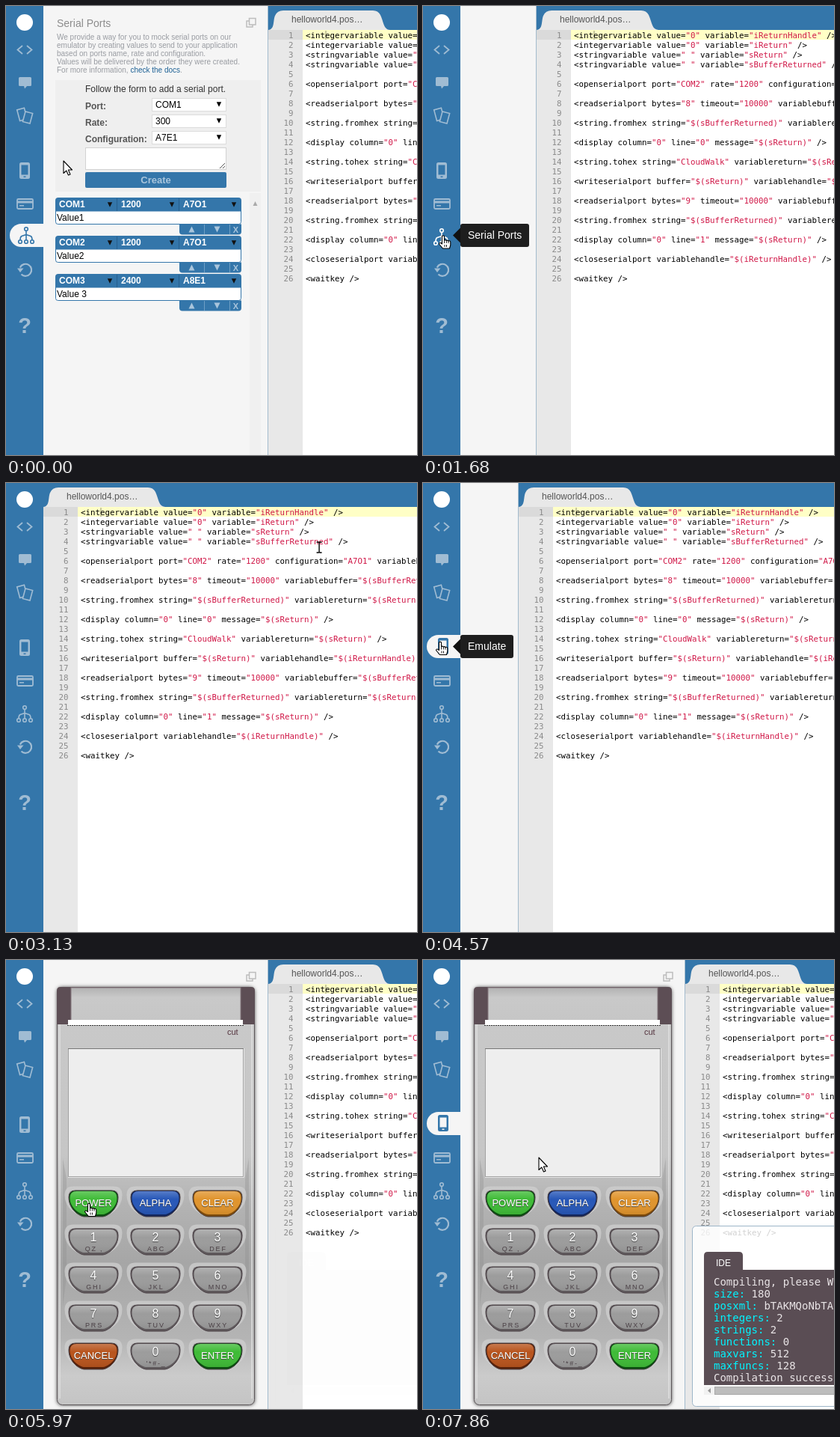
An HTML page for the animation above (8000 ms loop, 550 by 600 pixels).

```html
<!DOCTYPE html>
<html lang="en">
<head>
<meta charset="utf-8">
<title>Serial ports and emulator</title>
<style>
  html, body { margin: 0; width: 100%; height: 100%; overflow: hidden; background: #fff; }
  svg { display: block; width: 550px; height: 600px; }
  text { font-family: "Liberation Sans", Arial, sans-serif; white-space: pre; }
  .mono { font-family: "DejaVu Sans Mono", "Liberation Mono", monospace; }
  .code { font-size: 10.8px; }
  .b { font-weight: bold; }
</style>
</head>
<body>
<svg id="stage" viewBox="0 0 550 600" xmlns="http://www.w3.org/2000/svg"></svg>
<script>
const LOOP = 8000, OPEN = 351, SHUT = 50;
const BLUE = '#3476aa', PANEL = '#f5f5f5', ICON = '#a0bcd3';
const SLIDE = 200, CLOSE_AT = 1560, OPEN_AT = 4503;

const esc = s => s.replace(/&/g, '&amp;').replace(/</g, '&lt;').replace(/>/g, '&gt;');
const rect = (x, y, w, h, fill, more = '') =>
  `<rect x="${x}" y="${y}" width="${w}" height="${h}" fill="${fill}" ${more}/>`;
const text = (x, y, size, fill, s, more = '') =>
  `<text x="${x}" y="${y}" font-size="${size}" fill="${fill}" ${more}>${esc(s)}</text>`;
const path = (d, fill, more = '') => `<path d="${d}" fill="${fill}" ${more}/>`;
const group = (id, body, more = '') => `<g id="${id}" ${more}>${body}</g>`;
const down = (x, y, fill, r = 3.5) => path(`M${x - r},${y - r}h${2 * r}l${-r},${2 * r}z`, fill);
const up = (x, y, fill, r = 4) => path(`M${x - r},${y + r}h${2 * r}l${-r},${-2 * r}z`, fill);

// Sidebar
const phoneIcon = path('M20.5,209h9a2.5,2.5 0 0 1 2.5,2.5v17a2.5,2.5 0 0 1 -2.5,2.5h-9a2.5,2.5 0 0 1 -2.5,-2.5v-17a2.5,2.5 0 0 1 2.5,-2.5z'
  + 'M20.5,212.5v13h9v-13zM23.5,227.5v1.5h3v-1.5z', 'currentColor', 'fill-rule="evenodd"');
const netIcon = [[25, 300], [17, 317], [25, 317], [33, 317]]
  .map(([x, y]) => `<circle cx="${x}" cy="${y}" r="2.3" fill="none" stroke="currentColor" stroke-width="1.6"/>`).join('')
  + path('M25,302.5V314.5M25,307.5L19,309.5Q17,310.5 17,314.5M25,307.5L31,309.5Q33,310.5 33,314.5', 'none',
    'stroke="currentColor" stroke-width="1.6"');
const pill = y => path(`M50,${y}H20.5a15.5,15.5 0 0 0 0,31H50z`, PANEL);

function sidebar() {
  const line = `stroke="${ICON}" stroke-width="1.8"`;
  return rect(0, 0, 50, 600, BLUE)
    + '<circle cx="25" cy="22" r="11" fill="#fff"/>'
    + path('M22,53L15.5,58.5L22,64M28,53L34.5,58.5L28,64', 'none', line)
    + path('M18.5,95h14a1.5,1.5 0 0 1 1.5,1.5v9a1.5,1.5 0 0 1 -1.5,1.5h-4.5l-3,3.5l-1,-3.5h-5.5a1.5,1.5 0 0 1 -1.5,-1.5v-9a1.5,1.5 0 0 1 1.5,-1.5z', ICON)
    + rect(16.5, 137.5, 10, 15, 'none', `stroke="${ICON}" stroke-width="1.6" transform="rotate(-15 21 145)"`)
    + rect(24, 142, 10, 14, BLUE, `stroke="${ICON}" stroke-width="1.6" transform="rotate(15 29 149)"`)
    + rect(15, 258, 21, 13, 'none', `rx="1.5" ${line}`) + rect(15, 260.5, 21, 3, ICON)
    + rect(18, 266, 6, 1.5, ICON)
    + path('M18.8,349.5A8,8 0 1 1 20.5,358.5', 'none', `stroke="${ICON}" stroke-width="2.2"`)
    + path('M15,350.5h8.5l-4.5,5.5z', ICON)
    + text(25, 437, 29, ICON, '?', 'class="b" text-anchor="middle"')
    + group('phonePill', pill(203)) + group('phone', phoneIcon)
    + group('netPill', pill(291)) + group('net', netIcon);
}

const popIcon = '<g fill="#f5f5f5" stroke="#bdbdbd" stroke-width="1.5"><rect x="322" y="20" width="8" height="8"/><rect x="325.500" y="16.500" width="8.500" height="8.500"/></g>';

// Serial port form and list
function select(y, label, value) {
  return text(106, y + 15, 12, '#555', label, 'class="b"')
    + rect(195.5, y + .5, 99, 17, '#fff', 'stroke="#dcdcdc"')
    + text(200, y + 13, 12, '#000', value) + down(285, y + 8.5, '#000', 3.2);
}

function port(y, name, rate, config, value) {
  const pale = '#a9c5dc';
  return rect(66.5, y + 4, 248, 31.5, '#fff', `rx="3" stroke="${BLUE}"`)
    + path(`M66,${y + 18.5}v-14.500a4,4 0 0 1 4,-4h241a4,4 0 0 1 4,4v14.500z`, BLUE)
    + [148, 231].map(x => rect(x, y + 1, 1, 17, '#275f8d')).join('')
    + [name, rate, config].map((s, i) => text(71 + 83 * i, y + 13, 12, '#fff', s, 'class="b"')
      + down(139 + 83 * i, y + 9.5, '#111', 3.2)).join('')
    + text(68, y + 31, 12, '#000', value)
    + path(`M232,${y + 35.5}h83v10a4,4 0 0 1 -4,4h-75a4,4 0 0 1 -4,-4z`, BLUE)
    + [265, 299].map(x => rect(x, y + 36, 1, 13, '#6f9fc5')).join('')
    + up(248.5, y + 42.5, pale) + down(282.5, y + 42.5, pale, 4)
    + text(307.5, y + 47, 11, pale, 'X', 'class="b" text-anchor="middle"');
}

function serialPanel() {
  const intro = ['We provide a way for you to mock serial ports on our',
    'emulator by creating values to send to your application',
    'based on ports name, rate and configuration.',
    'Values will be delivered by the order they were created.'];
  return text(68, 28, 14, '#8c8c8c', 'Serial Ports') + popIcon
    + intro.map((s, i) => text(68, 45 + 10.9 * i, 10, '#999ca2', s)).join('')
    + '<text x="68" y="88.600" font-size="10" fill="#999ca2">For more information, <tspan fill="#1f6296">check the docs</tspan>.</text>'
    + rect(66, 99, 275, 149, '#efefef')
    + text(106, 115, 12, '#333', 'Follow the form to add a serial port.')
    + select(123, 'Port:', 'COM1') + select(145, 'Rate:', '300') + select(167, 'Configuration:', 'A7E1')
    + rect(106.5, 189.5, 188, 29, '#fff', 'stroke="#d2d2d2"')
    + path('M286,217l7,-7M290,217l3,-3', 'none', 'stroke="#555"')
    + rect(106, 222, 189, 21, BLUE, 'rx="2"')
    + text(200.5, 237, 13, '#a9c5dc', 'Create', 'class="b" text-anchor="middle"')
    + rect(326, 250, 15, 350, '#f0f0f0') + up(333.5, 264, '#aaa', 3)
    + port(256, 'COM1', '1200', 'A7O1', 'Value1')
    + port(307, 'COM2', '1200', 'A7O1', 'Value2')
    + port(358, 'COM3', '2400', 'A8E1', 'Value 3');
}

// Card terminal
const KEYS = ['POWER', 'ALPHA', 'CLEAR', '1QZ ,', '2ABC', '3DEF', '4GHI', '5JKL', '6MNO',
  '7PRS', '8TUV', '9WXY', 'CANCEL', "0'*#-_", 'ENTER'];
const TINT = {
  POWER: ['#3fbb37', '#0b4d10'], ENTER: ['#3fbb37', '#0b4d10'], ALPHA: ['#2757b8', '#13265c'],
  CLEAR: ['#e0942d', '#7c4a0c'], CANCEL: ['#b8541d', '#57210a']
};
const bowl = (w, h) => `M${-w},9Q${-w},0 ${9 - w},0H${w - 9}Q${w},0 ${w},9C${w},${h * .74} ${w * .55},${h} 12,${h}`
  + `H-12C${-w * .55},${h} ${-w},${h * .74} ${-w},9z`;

function key(label, i) {
  const [face, edge] = TINT[label] || ['#9c9c9c', '#5f595c'];
  const x = 117 + 83 * (i % 3), y = 308 + 51 * Math.floor(i / 3);
  const shadow = 'text-anchor="middle" style="text-shadow:0 1px 1px #444"';
  const caption = TINT[label]
    ? text(0, 21, 13, '#fff', label, shadow)
    : text(0, 17, 16, '#fff', label[0], shadow)
      + text(1, 29.5, 9, '#4b4146', label.slice(1), 'text-anchor="middle" letter-spacing="1.8"');
  return `<g transform="translate(${x},${y})">`
    + path(bowl(36, 35), 'none', 'transform="translate(0,-3)" stroke="#cfcfcf" stroke-width="5" opacity=".75"')
    + path(bowl(33, 35), edge, 'stroke="#4a4045" stroke-width="1"')
    + path(bowl(31.5, 31), face, 'transform="translate(0,1)"')
    + path(bowl(31.5, 31), 'url(#gloss)', 'transform="translate(0,1)"')
    + caption + '</g>';
}

function terminal() {
  return popIcon
    + rect(68, 36, 265, 559, '#555', 'rx="7" filter="url(#soft)"')
    + rect(68.5, 36.5, 264, 558, 'url(#body)', 'rx="7" stroke="#5b5558"')
    + rect(71, 86, 2, 500, '#e2e2e2', 'opacity=".7"') + rect(328, 86, 2, 500, '#e2e2e2', 'opacity=".7"')
    + path('M76,265l5,28v130l-5,40zM325,265l-5,28v130l5,40z', '#8e8e8e', 'opacity=".35"')
    + path('M68,86V41q0,-5 5,-5H328q5,0 5,5V86z', '#5d4e55')
    + rect(87, 37, 227, 44, 'url(#slot)', 'stroke="#85787e"')
    + rect(83, 80, 234, 7, '#fff')
    + path('M82,87.5H318', 'none', 'stroke="#333" stroke-dasharray="2 1"')
    + text(296, 100, 11, '#54333e', 'cut')
    + rect(83.5, 118.5, 234, 171, '#eee', 'stroke="#a2a2a2"')
    + path('M83,118.5H318', 'none', 'stroke="#777"')
    + path('M83,290.500H318.500V118', 'none', 'stroke="#e6e6e6"')
    + KEYS.map(key).join('');
}

// Code editor, drawn from its own left edge
const fromHex = '<string.fromhex string="$(sBufferReturned)" variablereturn="$(sReturn)" />';
const read = n => `<readserialport bytes="${n}" timeout="10000" variablebuffer="$(sBufferReturned)" />`;
const show = n => `<display column="0" line="${n}" message="$(sReturn)" />`;
const CODE = [
  '<integervariable value="0" variable="iReturnHandle" />',
  '<integervariable value="0" variable="iReturn" />',
  '<stringvariable value=" " variable="sReturn" />',
  '<stringvariable value=" " variable="sBufferReturned" />', '',
  '<openserialport port="COM2" rate="1200" configuration="A7O1" variablehandle="$(iReturnHandle)" />', '',
  read(8), '', fromHex, '', show(0), '',
  '<string.tohex string="CloudWalk" variablereturn="$(sReturn)" />', '',
  '<writeserialport buffer="$(sReturn)" variablehandle="$(iReturnHandle)" />', '',
  read(9), '', fromHex, '', show(1), '',
  '<closeserialport variablehandle="$(iReturnHandle)" />', '', '<waitkey />'];

function codeLine(s, i) {
  const y = 43 + 13 * i;
  const colored = esc(s).replace(/"[^"]*"/g, q => `<tspan fill="#d01747">${q}</tspan>`);
  return text(33.5, y, 10.8, '#8a8a8a', String(i + 1), 'class="mono" text-anchor="end"')
    + `<text x="50" y="${y}" class="mono code" fill="#000">${colored}</text>`;
}

function editor() {
  return rect(0, 0, 520, 32, BLUE) + rect(46, 32, 480, 568, '#fff')
    + rect(0, 32, 46, 568, '#e8e8e8')
    + rect(0, 32, 46, 13, '#dadada') + rect(46, 32, 480, 13, '#ffffc6')
    + path('M0,32C9,31 6,20 9,13Q12,6 20,6H140Q147,6 150,12C155,23 154,31 163,32z', '#e8e8e8')
    + text(31, 22, 12, '#555', 'helloworld4.pos…')
    + rect(76.5, 33, 1, 12, '#8f8f70')
    + CODE.map(codeLine).join('')
    + group('edge', rect(-1, 0, 1, 600, '#a3bbcd'));
}

// Compiler output
const LOG = ['Compiling, please Wait', 'size: 180', 'posxml: bTAKMQoNbTAKMQ', 'integers: 2', 'strings: 2',
  'functions: 0', 'maxvars: 512', 'maxfuncs: 128', 'Compilation successful'];

function consoleBox() {
  const lines = LOG.map((s, i) => `<text x="389" y="${435 + 16 * i}" font-size="14" class="mono" fill="#e9e4e6">`
    + s.replace(/^\w+:/, k => `<tspan fill="#00f4ff">${k}</tspan>`) + '</text>').join('');
  return rect(360.5, 355.5, 220, 241, '#fff', 'fill-opacity=".82" rx="5" stroke="#9db5c8"')
    + path('M376,414V395q0,-5 5,-5h42q5,0 5,5v19z', '#5a4d54')
    + text(392, 409, 12, '#fff', 'IDE')
    + rect(376, 414, 180, 154, '#5a4d54')
    + rect(376, 570, 180, 11, '#f1f1f1') + path('M381,575.500l4,-3.500v7z', '#999')
    + group('log', lines + rect(390.5, 570.5, 170, 10, '#bdbdbd', 'stroke="#a8a8a8"'));
}

function tip(id, y, label, w) {
  return group(id, path(`M40,${y + 15.5}l10,-10v20z`, '#111') + rect(50, y, w, 31, '#1e1e1e', 'rx="3"')
    + text(60, y + 20, 14, '#fff', label));
}

const ink = 'stroke="#000" stroke-width="1.1" stroke-linejoin="round"';
const cursors =
  group('arrow', path('M0,0V16.500L3.800,13L6.500,19L9,18L6.400,12H11.500z', '#fff', ink))
  + group('hand', path('M-1.500,1Q0,-.5 1.500,1V6.500Q3,5.500 4.300,7Q6,6 7,7.600Q9.500,6.500 9.800,9V13L8.500,17.500H-.5'
    + 'L-5.500,11.500Q-5,9 -2.500,10.500L-1.500,11.500z', '#fff', ink)
    + path('M1.500,6.500v4M4.300,7v3.500M7,7.600v3M2,12.500v3M4.500,12.500v3', 'none', 'stroke="#000" stroke-width=".9"'))
  + group('beam', path('M-3.500,-7H-1Q0,-7 0,-6Q0,-7 1,-7H3.500M0,-6V6M-3.500,7H-1Q0,7 0,6Q0,7 1,7H3.500', 'none',
    'stroke="#000" stroke-width="1.4"'));

const stops = list => list.map(([o, c]) => `<stop offset="${o}" stop-color="${c}"/>`).join('');
const gradient = (id, list) => `<linearGradient id="${id}" x2="0" y2="1">${stops(list)}</linearGradient>`;
const stage = document.getElementById('stage');
stage.innerHTML = '<defs>'
  + gradient('body', [[0, '#c9c9c9'], [.4, '#c6c6c6'], [.52, '#b3b3b3'], [.66, '#a6a6a6'], [.84, '#b4b4b4'], [.93, '#cbcbcb'], [1, '#c4c4c4']])
  + gradient('slot', [[0, '#b2b2b2'], [.3, '#c9c9c9'], [1, '#c6c6c6']])
  + '<linearGradient id="gloss" x2="0" y2="1"><stop offset="0" stop-color="#fff" stop-opacity=".22"/>'
  + '<stop offset=".35" stop-color="#fff" stop-opacity="0"/><stop offset="1" stop-color="#000" stop-opacity=".08"/></linearGradient>'
  + '<filter id="soft" x="-10%" y="-5%" width="120%" height="110%"><feGaussianBlur stdDeviation="2.5"/></filter></defs>'
  + rect(0, 0, 550, 600, PANEL) + group('serial', serialPanel()) + group('device', terminal())
  + group('editor', editor()) + group('console', consoleBox()) + sidebar()
  + tip('netTip', 291, 'Serial Ports', 92) + tip('phoneTip', 203, 'Emulate', 71)
  + group('cursor', cursors);

const el = {};
stage.querySelectorAll('g[id]').forEach(g => el[g.id] = g);
const toggle = (id, on) => { el[id].style.display = on ? '' : 'none'; };
const clamp = v => Math.max(0, Math.min(1, v));
const swing = v => .5 - Math.cos(Math.PI * clamp(v)) / 2;

// Pointer path: time, x, y
const PATH = [[0, 77, 207], [500, 77, 207], [760, 34, 268], [900, 20, 296], [1010, 27, 306.5], [1690, 27, 306.5],
  [1900, 75, 238], [2090, 165, 160], [2270, 245, 115], [2560, 330, 100], [2850, 388, 90], [3080, 410, 86],
  [3130, 419, 86], [3200, 424, 85], [3350, 370, 102], [3600, 190, 160], [3800, 55, 206], [3910, 24, 213],
  [3990, 24, 211], [4150, 23, 212], [4570, 23, 212], [4770, 31, 212], [4950, 60, 245], [5130, 95, 315],
  [5280, 108, 352], [5560, 111, 325], [6020, 111, 325], [6350, 138, 288], [6640, 155, 264], [LOOP, 155, 264]];

function pointer(t) {
  const i = PATH.findIndex((p, n) => n && t <= p[0]);
  const [t0, x0, y0] = PATH[i - 1], [t1, x1, y1] = PATH[i];
  const k = (t - t0) / (t1 - t0);
  return [x0 + (x1 - x0) * k, y0 + (y1 - y0) * k];
}

function overKey(x, y) {
  const dx = (x - 84 + 83) % 83, dy = (y - 308) % 51;
  return x > 84 && x < 316 && y > 308 && y < 547 && dx < 66 && dy < 35;
}

function menuItem(id, active, hover) {
  toggle(id + 'Pill', active);
  toggle(id + 'Tip', hover);
  el[id].style.color = active ? BLUE : hover ? '#fff' : ICON;
  el[id].setAttribute('transform', active ? 'translate(2,-2)' : '');
}

function draw(t) {
  const openness = 1 - swing((t - CLOSE_AT) / SLIDE) + swing((t - OPEN_AT) / SLIDE);
  const edge = Math.round(SHUT + (OPEN - SHUT) * openness);
  el.editor.setAttribute('transform', `translate(${edge},0)`);
  toggle('edge', edge > SHUT);

  const emulating = t >= OPEN_AT + SLIDE;
  toggle('serial', t < CLOSE_AT);
  toggle('device', emulating && !(t >= 7530 && t < 7860));
  toggle('console', t >= 5970);
  el.console.style.opacity = clamp((t - 5970) / 250);
  toggle('log', t >= 7010);

  const [x, y] = pointer(t);
  const inMenu = x < 50;
  menuItem('net', t < 1490, inMenu && Math.abs(y - 306) < 18);
  menuItem('phone', t >= 4490 && t < 5970 || t >= 7530, inMenu && Math.abs(y - 218) < 16);

  const shape = inMenu || emulating && overKey(x, y) ? 'hand' : x > edge + 46 ? 'beam' : 'arrow';
  for (const s of ['arrow', 'hand', 'beam']) toggle(s, s === shape);
  el.cursor.setAttribute('transform', `translate(${x.toFixed(1)},${y.toFixed(1)})`);
}

const start = performance.now();
function tick() {
  draw((performance.now() - start) % LOOP);
  requestAnimationFrame(tick);
}
tick();
</script>
</body>
</html>
```
